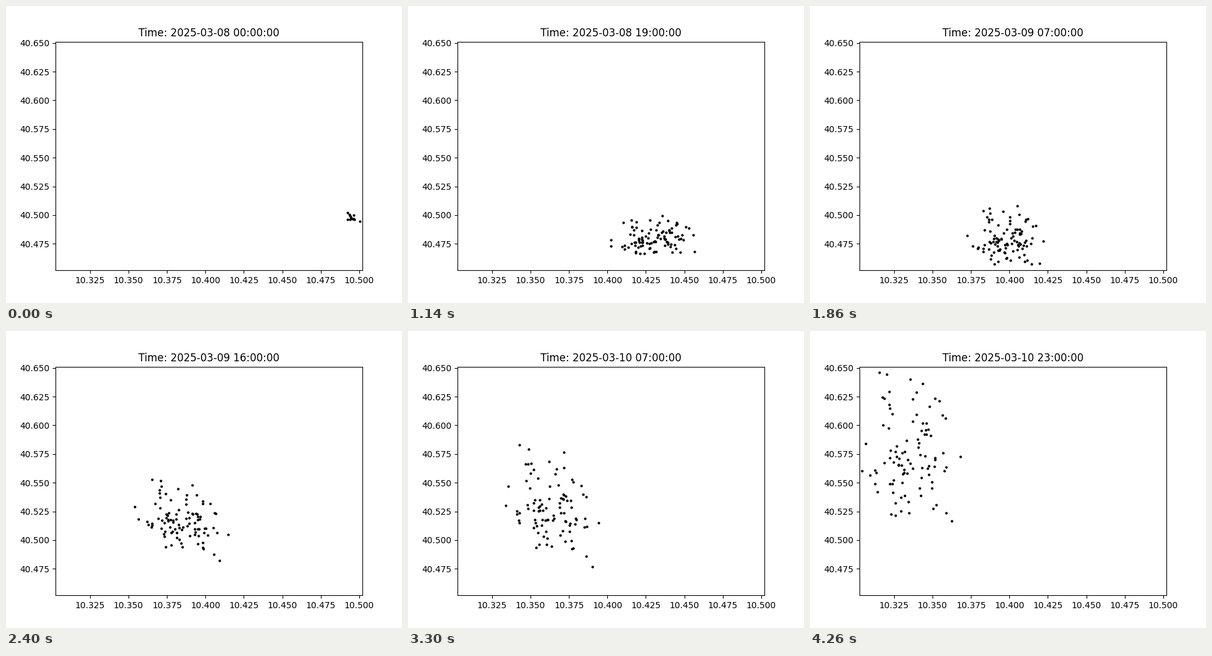
A matplotlib script that plays this animation: 640x480 px, repeating every 4.32 s.

```python
import matplotlib.pyplot as plt
import numpy as np
from matplotlib.animation import FuncAnimation

HOURS = 72
PER_RELEASE = 12
RELEASES = 8
COUNT = PER_RELEASE * RELEASES
DRIFT_START = 19
ORIGIN = np.array([10.3, 40.45])

# Release site, in thousandths of a degree from ORIGIN
SITE = np.array([
    (192.3, 52.1), (193.5, 50.5), (193.9, 49.4), (194.3, 48.3),
    (196.4, 50.0), (192.3, 46.2), (193.9, 46.2), (194.7, 47.3),
    (195.6, 46.7), (196.4, 46.7), (196.8, 46.2), (200.4, 44.6),
])

# Cloud shape: hour, centre x, centre y, spread x, spread y, correlation
CLOUD = np.array([
    (19, 130.0, 30.0, 12.5, 8.1, 0.0),
    (27, 111.0, 25.7, 11.4, 10.0, -0.1),
    (31, 98.3, 29.0, 10.9, 12.4, -0.2),
    (36, 88.2, 46.7, 12.0, 14.0, -0.35),
    (40, 84.6, 67.2, 13.2, 15.6, -0.45),
    (45, 81.8, 74.8, 13.5, 18.0, -0.5),
    (49, 79.8, 79.1, 13.6, 20.0, -0.5),
    (54, 66.9, 76.9, 13.4, 23.0, -0.45),
    (61, 44.0, 91.0, 13.3, 27.0, -0.3),
    (64, 37.0, 98.5, 13.5, 29.0, -0.25),
    (71, 35.6, 125.5, 14.0, 33.4, -0.2),
])


def standardize(v):
    return (v - v.mean()) / v.std()


def cloud_at(hour):
    """Cubic Hermite interpolation of the cloud shape."""
    t, v = CLOUD[:, 0], CLOUD[:, 1:]
    slope = np.gradient(v, t, axis=0)
    i = int(np.clip(np.searchsorted(t, hour, side="right") - 1, 0, len(t) - 2))
    h = t[i + 1] - t[i]
    s = (hour - t[i]) / h
    return ((1 + 2 * s) * (1 - s) ** 2 * v[i]
            + s * (1 - s) ** 2 * h * slope[i]
            + s * s * (3 - 2 * s) * v[i + 1]
            + s * s * (s - 1) * h * slope[i + 1])


rng = np.random.default_rng(8)
release = np.arange(COUNT) // PER_RELEASE
start = np.tile(SITE, (RELEASES, 1))
start[PER_RELEASE:] += rng.normal(0, 1, (COUNT - PER_RELEASE, 2))

# Late releases trail behind on the east side
zx = standardize(np.linspace(-1, 1, COUNT) + rng.normal(0, 0.5, COUNT)).clip(-2.2, 2.2)
zy = standardize(rng.normal(0, 1, COUNT)).clip(-2.4, 2.4)

steps = rng.normal(0, (0.35, 0.45), (HOURS, COUNT, 2))
steps[:DRIFT_START + 1] = 0
walk = steps.cumsum(axis=0)


def spread_cloud(hour):
    cx, cy, sx, sy, rho = cloud_at(hour)
    x = cx + sx * zx
    y = cy + sy * (rho * zx + np.sqrt(1 - rho ** 2) * zy)
    return np.column_stack([x, y]) + walk[hour]


def positions(hour):
    if hour >= DRIFT_START:
        pos = spread_cloud(hour)
    else:
        live = release <= hour
        age = (hour - release[live]) / (DRIFT_START - release[live])
        ease = np.column_stack([age, age ** 0.65])
        pos = start[live] + (spread_cloud(DRIFT_START)[live] - start[live]) * ease
    return ORIGIN + pos / 1000


fig, ax = plt.subplots(figsize=(6.4, 4.8), dpi=100)
ax.set_xlim(10.3026, 10.502)
ax.set_ylim(40.4519, 40.6511)
ax.ticklabel_format(useOffset=False)
dots, = ax.plot([], [], "k.", markersize=4)
title = ax.set_title("")


def update(hour):
    dots.set_data(*positions(hour).T)
    title.set_text(f"Time: 2025-03-{8 + hour // 24:02d} {hour % 24:02d}:00:00")
    return dots, title


anim = FuncAnimation(fig, update, frames=HOURS, interval=60,
                     repeat=True, repeat_delay=0)
plt.show()
```
